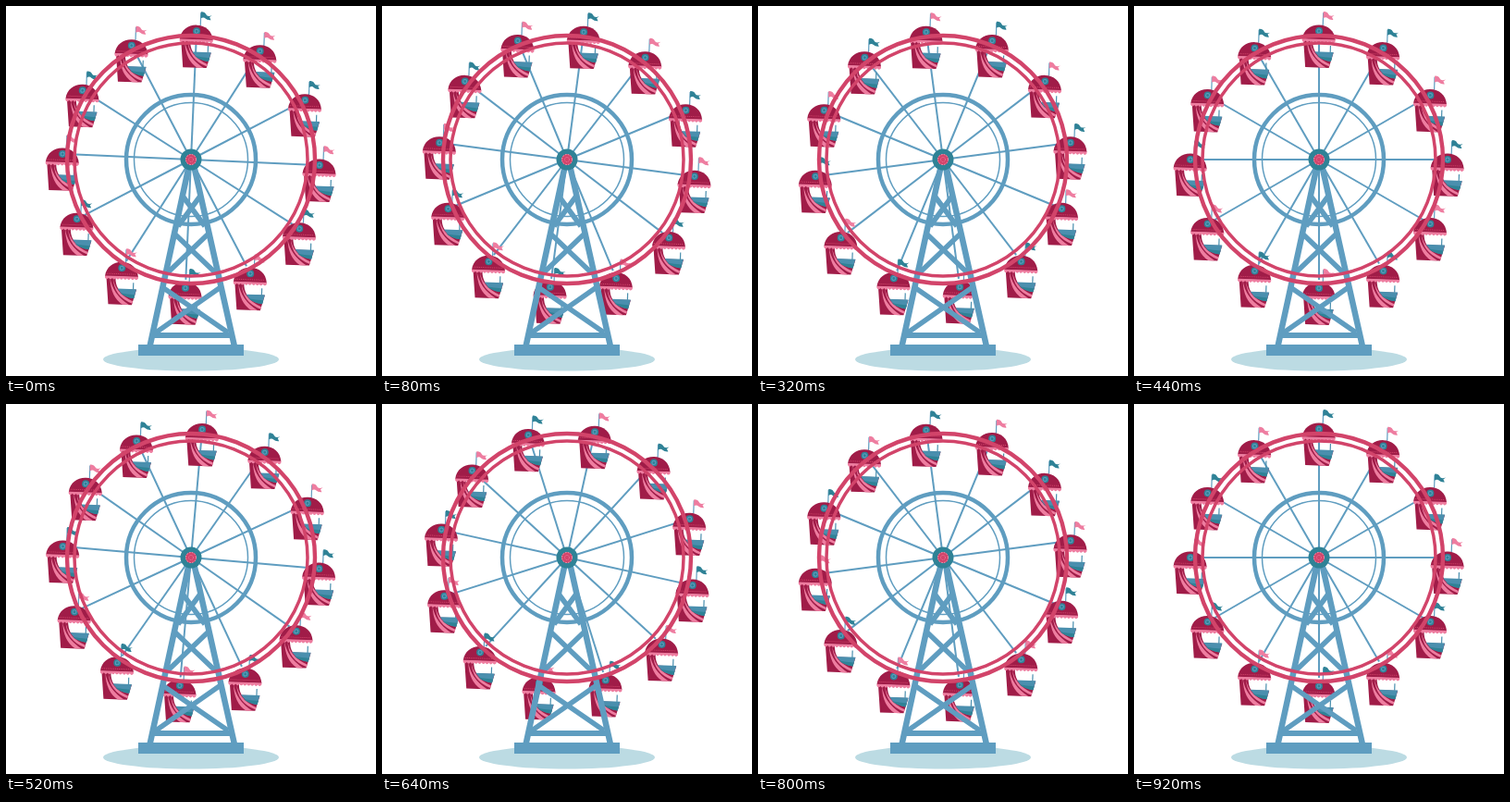
These frames come from a looping animation (400x400 px, 960 ms). An HTML page:

```html
<!DOCTYPE html>
<html lang="en">
<head>
<meta charset="utf-8">
<title>Ferris wheel</title>
<style>
  html, body { margin: 0; width: 100%; height: 100%; overflow: hidden; background: #fff; }
  svg { display: block; width: 100%; height: 100%; }
  .line { fill: none; stroke: #5f9dc0; }
  .rim { fill: none; stroke: #d2446a; stroke-width: 4.4; }
</style>
</head>
<body>
<svg viewBox="0 0 400 400">
  <defs>
    <g id="cabin">
      <path d="M4-6V-20" stroke="#5f9dc0" stroke-width="1.2"/>
      <path d="M4-21Q8-21.500 9.500-18.500T16-17.500L13.500-15.500 15-12.500Q11-12 9-14T4-14Z" fill="currentColor"/>
      <path d="M-16.500 10L-13.500 39.500H12L16.500 23H-3Q-6.500 18-6.500 10Z" fill="#a01c48"/>
      <path d="M-12.500 11Q-9 29 9 39.500H2Q-11 32-12.500 11Z" fill="#ee7da0"/>
      <path d="M-9 11Q-7 27 13 35.500L12.500 38Q-8 31-9 11Z" fill="#ee7da0"/>
      <path d="M-4 22.500H16.500L14 32.500Q2 31.500-4 22.500Z" fill="#4a8fae"/>
      <path d="M-1 27Q6 28 15 28.500L14 32.500Q4 31.500-1 27Z" fill="#2f8296"/>
      <path d="M13 15.500V23" stroke="#4a8fae" stroke-width="1.2"/>
      <path d="M-18 9.500C-17-1-9-6.500 0-6.500S17-1 18 9.500Z" fill="#a01c48"/>
      <path d="M-18 9H18V11q-2 3-4 0q-2 3-4 0q-2 3-4 0q-2 3-4 0q-2 3-4 0q-2 3-4 0q-2 3-4 0q-2 3-4 0q-2 3-4 0Z" fill="#ee7da0"/>
      <path d="M-16 6.500H16" stroke="#d2446a" stroke-dasharray="1 1"/>
      <circle r="4" fill="#2f8296"/>
      <circle r="2" class="line"/>
    </g>
  </defs>
  <ellipse cx="200" cy="382" rx="95" ry="12.500" fill="#bcdbe3"/>
  <g id="spokes" class="line" stroke-width="2"></g>
  <g id="cabins"></g>
  <g class="line">
    <path d="M198 172L155.500 368M203 172L247 368" stroke-width="6.500"/>
    <path d="M158 356H244" stroke-width="6"/>
    <path d="M162 353L232 304M240 353L169 304M174 289L219 246M227 289L182 246M186 238L211 204M215 238L190 204" stroke-width="5.500"/>
  </g>
  <path d="M143 366H257V378H143Z" fill="#5f9dc0"/>
  <g transform="translate(200 166)">
    <circle r="70" class="line" stroke-width="4.500"/>
    <circle r="61.500" class="line" stroke-width="1.500"/>
    <circle r="134" class="rim"/>
    <circle r="126" class="rim" style="stroke-width:3.500"/>
    <circle r="11.500" fill="#2f8296"/>
    <circle r="6" fill="#d2446a"/>
    <circle r="5.500" fill="none" stroke="#f3a5bb" stroke-dasharray="1.500 1.400"/>
    <circle r="2.500" fill="none" stroke="#ee7da0" stroke-dasharray="1 1"/>
  </g>
</svg>
<script>
const COUNT = 12, STEP = 40, LOOP = 960, RADIUS = 139, TILT = 2;

function add(parent, tag, attributes) {
  const node = document.createElementNS("http://www.w3.org/2000/svg", tag);
  for (const name in attributes) node.setAttribute(name, attributes[name]);
  return document.getElementById(parent).appendChild(node);
}

const cabins = Array.from({ length: COUNT }, (_, i) => {
  add("spokes", "path", { d: "M200 166V36", transform: `rotate(${i * 360 / COUNT} 200 166)` });
  return add("cabins", "use", { href: "#cabin", color: i % 2 ? "#ee7da0" : "#2f8296" });
});
const spokes = document.getElementById("spokes");

function draw(now) {
  // The wheel advances two cabins per loop, so flag colours line up again.
  const turn = (Math.floor(now % LOOP / STEP) + 1) * 2.5;
  spokes.setAttribute("transform", `rotate(${turn} 200 166)`);
  cabins.forEach((cabin, i) => {
    const angle = (turn + i * 360 / COUNT) * Math.PI / 180;
    const x = 200 + RADIUS * Math.sin(angle);
    const y = 166 - RADIUS * Math.cos(angle);
    cabin.setAttribute("transform", `translate(${x} ${y}) rotate(${TILT})`);
  });
  requestAnimationFrame(draw);
}
draw(performance.now());
</script>
</body>
</html>
```
